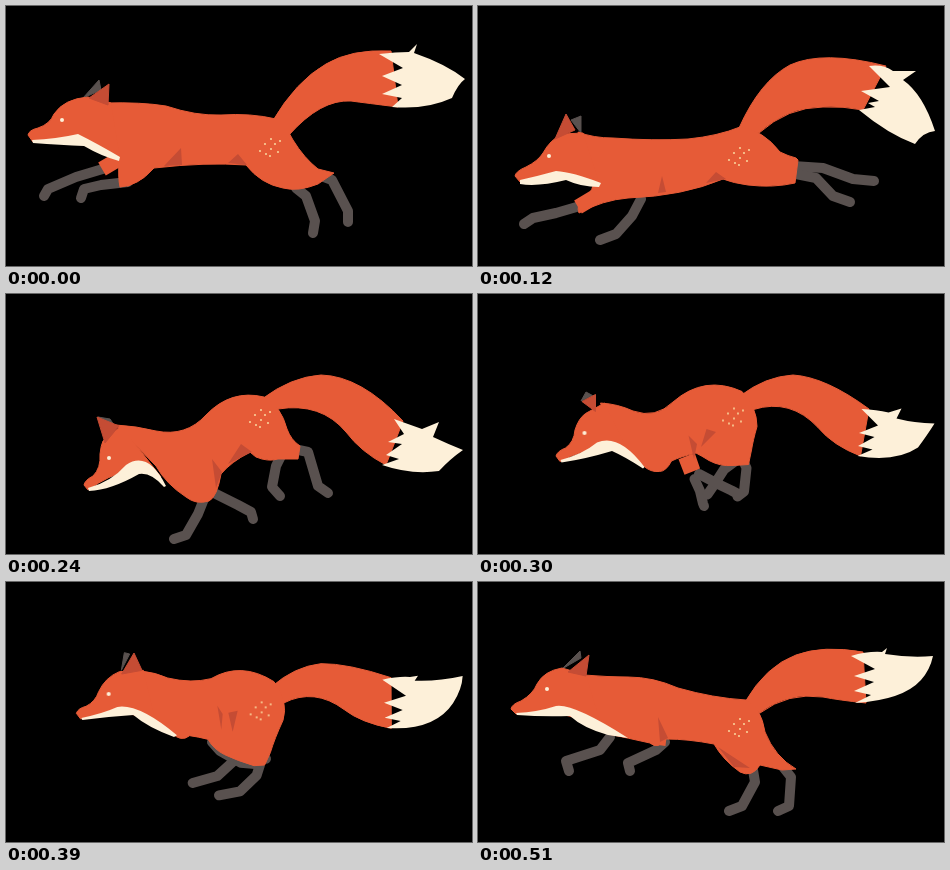
An HTML page without scripts that plays this animation: 466 by 260 pixels, repeating every 0.54 s.

```html
<!DOCTYPE html>
<html lang="en">
<head>
<meta charset="utf-8">
<title>Running fox</title>
<style>
html, body { margin: 0; width: 100%; height: 100%; overflow: hidden; background: #000; }
svg { display: block; width: 100vw; height: 100vh; }
svg * { animation: .54s steps(2) infinite; }
.fur { fill: #e65b37; stroke: #e65b37; }
.shade { fill: #c54c34; stroke: #c54c34; }
.cream { fill: #fdf0d9; }
.dark { fill: #59514f; stroke: #59514f; }
.limb { fill: none; stroke-width: 10; stroke-linecap: round; }
.arm { stroke-width: 15; }

/* Poses are joined by 30 ms steps. */
#tail { animation-name: tail; }
@keyframes tail {
  0% { d: path("M266 116Q290 75 320 58Q345 43 385 45L392 101Q360 97 345 95Q315 93 283 129Z"); animation-timing-function: steps(1) }
  11.111% { d: path("M256 113Q275 70 305 52Q340 35 385 39L392 84Q365 86 345 91Q305 99 273 119Z") }
  22.222% { d: path("M261 122Q282 75 312 59Q345 44 408 60L385 104Q365 100 345 101Q310 101 281 127Z"); animation-timing-function: steps(4) }
  44.444% { d: path("M256 105Q285 83 315 81Q355 82 397 127L380 171Q355 158 340 138Q315 108 272 115Z"); animation-timing-function: steps(4) }
  66.666% { d: path("M268 99Q290 82 315 81Q340 84 385 103L385 153Q355 145 340 129Q310 100 279 116Z"); animation-timing-function: steps(3) }
  83.333% { d: path("M261 116Q285 90 315 83Q345 76 385 81L386 133Q355 132 335 125Q305 116 275 131Z") }
  94.444% { d: path("M267 120Q288 84 318 73Q345 63 385 70L388 121Q360 118 345 115Q310 110 282 131Z"); animation-timing-function: steps(1) }
}
#tip { animation-name: tip; }
@keyframes tip {
  0% { d: path("M373 48Q390 46 403 46L411 38L408 47Q440 58 459 73Q452 78 446 92Q420 104 386 101L396 92L376 88L396 79L376 70L397 62Z"); animation-timing-function: steps(1) }
  11.111% { d: path("M371 41Q388 36 400 40L409 25L408 43Q435 62 455 90Q443 86 434 90Q415 84 390 84L392 76L376 78L392 66L372 62L393 50Z") }
  22.222% { d: path("M391 60Q405 58 415 65L438 65L425 74Q445 88 457 125Q445 126 437 138Q410 128 381 104L397 101L390 97L401 95L383 85L412 81Z"); animation-timing-function: steps(4) }
  44.444% { d: path("M388 125Q402 130 416 135L433 128L427 143Q442 150 457 156Q444 165 433 177Q405 181 376 171L393 165L380 161L396 150L382 148L398 140Z"); animation-timing-function: steps(4) }
  66.666% { d: path("M379 105Q395 101 405 102L414 101L410 106Q430 108 456 103Q456 115 447 130Q430 156 383 153L396 146L380 143L397 136L380 130L402 123Z"); animation-timing-function: steps(3) }
  83.333% { d: path("M371 83Q390 80 402 81L408 79L406 84Q435 83 458 76Q456 92 447 104Q425 136 376 132L392 125L376 121L396 112L374 102L396 95Z") }
  94.444% { d: path("M373 74Q390 69 404 70L409 66L407 72Q432 76 455 74Q452 88 443 98Q425 118 377 121L393 113L376 109L396 100L376 94L397 87Z"); animation-timing-function: steps(1) }
}
#torso { animation-name: torso; }
@keyframes torso {
  0% { d: path("M100 97Q135 96 160 100Q190 110 215 109Q245 107 270 113Q280 120 287 134Q298 152 312 163L328 167L312 178Q292 186 277 182Q255 178 240 159Q200 156 148 162Q132 180 114 181Q112 172 113 155Q95 140 75 132Z"); animation-timing-function: steps(1) }
  11.111% { d: path("M86 99Q105 113 125 115Q165 126 200 122Q235 116 252 110Q282 109 298 143Q305 152 320 153L332 153L328 170Q300 179 278 172Q262 168 240 162Q200 180 134 178Q122 180 108 184Q100 172 95 156Q85 140 70 138Z") }
  22.222% { d: path("M100 126Q115 132 135 132Q175 135 210 133Q240 130 262 121Q285 124 302 146Q310 150 318 152L320 154L317 177Q295 182 270 179Q255 177 245 173Q205 190 150 192Q125 194 101 207Q98 200 105 192Q122 182 110 165Z"); animation-timing-function: steps(4) }
  44.444% { d: path("M110 131Q130 132 150 137Q180 143 200 121Q225 95 258 103Q275 112 281 135Q285 146 294 152L292 165L272 165Q262 168 250 163Q246 160 244 158Q225 168 215 180Q211 203 203 207Q190 211 180 203Q160 190 150 172Z"); animation-timing-function: steps(4) }
  66.666% { d: path("M135 87Q150 88 160 97Q175 107 190 95Q228 66 270 92Q283 115 277 130Q265 147 253 160L249 176L238 178Q222 177 212 170Q200 163 192 160Q180 157 172 154Q165 152 160 148Q155 146 150 140Q140 130 125 122Z"); animation-timing-function: steps(3) }
  83.333% { d: path("M136 93Q150 96 165 94Q205 91 235 100Q250 105 264 115Q282 128 277 155Q276 175 287 192L278 197L268 195Q250 182 232 178Q223 176 222 152Q215 150 207 153Q207 168 203 173Q190 170 182 156Q160 152 130 130Z") }
  94.444% { d: path("M106 93Q130 95 150 95Q175 95 200 106Q235 116 268 118Q283 125 287 150Q297 175 318 187L304 188L282 183Q274 196 262 190Q245 178 236 162Q210 157 188 157Q180 168 172 161Q150 156 130 152Q110 145 90 130Z"); animation-timing-function: steps(1) }
}
#folds { animation-name: folds; }
@keyframes folds {
  0% { d: path("M158 160L175 142L176 159ZM222 157L232 148L241 159Z"); animation-timing-function: steps(1) }
  11.111% { d: path("M130 166L158 153L150 170ZM230 161L250 147L245 162Z") }
  22.222% { d: path("M180 187L184 170L188 186ZM228 177L238 166L248 173Z"); animation-timing-function: steps(4) }
  44.444% { d: path("M206 165L216 178L210 194ZM235 150L246 158L222 170Z"); animation-timing-function: steps(4) }
  66.666% { d: path("M215 118L222 122L222 136ZM222 120L230 118L224 136Z"); animation-timing-function: steps(3) }
  83.333% { d: path("M204 135L206 152L202 171ZM223 152L235 150L232 177Z") }
  94.444% { d: path("M180 135L190 156L182 160ZM240 165L272 186L256 185Z"); animation-timing-function: steps(1) }
}
#head { animation-name: head; }
@keyframes head {
  0% { d: path("M22 129Q23 124 32 122Q44 118 48 108Q58 93 82 91L105 97L114 153Q80 130 27 136Z"); animation-timing-function: steps(1) }
  11.111% { d: path("M18 144Q18 139 28 136Q42 130 46 121Q54 107 70 101L92 104L98 154Q70 140 22 148Z") }
  22.222% { d: path("M37 170Q38 165 48 161Q60 155 65 147Q72 134 84 128L105 127L122 179Q90 165 42 176Z"); animation-timing-function: steps(4) }
  44.444% { d: path("M78 191Q79 186 87 182Q95 174 94 160Q95 151 97 147L115 132L155 183Q125 165 82 196Z"); animation-timing-function: steps(4) }
  66.666% { d: path("M78 133Q80 128 88 126Q97 122 100 112Q106 98 118 92L138 86L150 140Q125 125 82 139Z"); animation-timing-function: steps(3) }
  83.333% { d: path("M55 128Q56 123 64 121Q74 115 78 105Q86 90 104 85L136 93L150 142Q110 122 60 133Z") }
  94.444% { d: path("M33 127Q34 122 43 119Q55 112 59 102Q66 89 84 86L108 93L125 149Q90 125 38 132Z"); animation-timing-function: steps(1) }
}
#cheek { animation-name: cheek; }
@keyframes cheek {
  0% { d: path("M26 134Q50 133 72 128Q92 138 114 151L113 155Q95 150 78 140Q55 139 27 137Z"); animation-timing-function: steps(1) }
  11.111% { d: path("M22 147Q42 146 58 139Q75 137 94 152L90 158Q78 155 70 149Q45 152 22 150Z") }
  22.222% { d: path("M42 174Q60 170 78 165Q95 166 123 177L121 181Q103 181 88 174Q60 181 42 178Z"); animation-timing-function: steps(4) }
  44.444% { d: path("M82 194Q105 188 120 171Q142 156 160 192L158 193Q145 178 133 180Q105 196 83 197Z"); animation-timing-function: steps(4) }
  66.666% { d: path("M83 138Q105 132 118 126Q140 122 173 154L172 156Q150 148 135 134Q110 134 84 140Z"); animation-timing-function: steps(3) }
  83.333% { d: path("M60 132Q82 130 98 123Q118 120 167 152L160 153Q125 140 112 131Q85 136 61 134Z") }
  94.444% { d: path("M38 131Q60 130 78 124Q95 121 150 156L130 153Q105 146 92 134Q65 135 39 133Z"); animation-timing-function: steps(1) }
}
#ear { animation-name: ear; }
@keyframes ear {
  0% { d: path("M83 92L103 78L102 99Z"); animation-timing-function: steps(1) }
  11.111% { d: path("M62 107L83 84L84 107Z") }
  22.222% { d: path("M77 133L88 108L97 124Z"); animation-timing-function: steps(4) }
  44.444% { d: path("M91 123L113 132L99 149Z"); animation-timing-function: steps(4) }
  66.666% { d: path("M117 92L122 69L136 86Z"); animation-timing-function: steps(3) }
  83.333% { d: path("M113 92L140 75L136 93Z") }
  94.444% { d: path("M90 90L111 73L108 94Z"); animation-timing-function: steps(1) }
}
#farEar { animation-name: farEar; }
@keyframes farEar {
  0% { d: path("M77 92L93 74L95 84Z"); animation-timing-function: steps(1) }
  11.111% { d: path("M83 95L90 86L89 102Z") }
  22.222% { d: path("M93 114L103 110L103 127Z"); animation-timing-function: steps(4) }
  44.444% { d: path("M92 123L104 125L110 134Z"); animation-timing-function: steps(4) }
  66.666% { d: path("M114 91L112 71L119 69Z"); animation-timing-function: steps(3) }
  83.333% { d: path("M118 83L131 70L133 78Z") }
  94.444% { d: path("M84 87L102 69L103 76Z"); animation-timing-function: steps(1) }
}
#farFore { animation-name: farFore; }
@keyframes farFore {
  0% { d: path("M100 162L70 171L42 183L38 190"); animation-timing-function: steps(1) }
  11.111% { d: path("M66 173L40 182L20 186L12 189") }
  22.222% { d: path("M102 200L78 207L55 212L46 218"); animation-timing-function: steps(4) }
  44.444% { d: path("M198 205L192 220L180 241L168 245"); animation-timing-function: steps(4) }
  66.666% { d: path("M235 165L252 174L270 178L284 179"); animation-timing-function: steps(3) }
  83.333% { d: path("M148 150L138 159L164 186L180 188") }
  94.444% { d: path("M132 155L122 168L88 179L91 189"); animation-timing-function: steps(1) }
}
#nearFore { animation-name: nearFore; }
@keyframes nearFore {
  0% { d: path("M122 176L95 179L78 183L75 192"); animation-timing-function: steps(1) }
  11.111% { d: path("M110 182L85 198L65 204L52 204") }
  22.222% { d: path("M163 193L154 210L138 228L122 234"); animation-timing-function: steps(4) }
  44.444% { d: path("M210 200L232 211L245 218L247 225"); animation-timing-function: steps(4) }
  66.666% { d: path("M232 160L250 170L262 175L275 176"); animation-timing-function: steps(3) }
  83.333% { d: path("M195 165L208 171L222 175L230 178") }
  94.444% { d: path("M187 160L178 168L150 181L152 189"); animation-timing-function: steps(1) }
}
#farHind { animation-name: farHind; }
@keyframes farHind {
  0% { d: path("M310 168L326 174L342 205L342 216"); animation-timing-function: steps(1) }
  11.111% { d: path("M328 160L343 161L370 186L386 191") }
  22.222% { d: path("M315 160L345 162L375 173L396 175"); animation-timing-function: steps(4) }
  44.444% { d: path("M288 155L302 158L312 192L322 199"); animation-timing-function: steps(4) }
  66.666% { d: path("M242 178L235 190L220 203L197 206"); animation-timing-function: steps(3) }
  83.333% { d: path("M278 192L282 200L262 222L245 228") }
  94.444% { d: path("M305 185L313 195L311 224L300 229"); animation-timing-function: steps(1) }
}
#nearHind { animation-name: nearHind; }
@keyframes nearHind {
  0% { d: path("M290 182L300 190L309 215L307 227"); animation-timing-function: steps(1) }
  11.111% { d: path("M315 172L325 182L340 193L350 196") }
  22.222% { d: path("M318 168L338 172L355 190L372 196"); animation-timing-function: steps(4) }
  44.444% { d: path("M275 162L270 172L266 193L274 202"); animation-timing-function: steps(4) }
  66.666% { d: path("M240 172L222 179L204 192L185 199"); animation-timing-function: steps(3) }
  83.333% { d: path("M228 175L238 180L226 198L190 205") }
  94.444% { d: path("M275 188L277 200L264 224L251 229"); animation-timing-function: steps(1) }
}
#arms { animation-name: arms; }
@keyframes arms {
  0% { d: path("M118 150L96 163M135 165L118 174"); animation-timing-function: steps(1) }
  11.111% { d: path("M115 160L64 174M145 165L108 183") }
  22.222% { d: path("M125 186L100 201M170 175L168 184"); animation-timing-function: steps(4) }
  44.444% { d: path("M195 180L195 196M200 180L200 196"); animation-timing-function: steps(4) }
  66.666% { d: path("M220 145L232 160M220 145L230 158"); animation-timing-function: steps(3) }
  83.333% { d: path("M165 135L155 143M190 145L194 160") }
  94.444% { d: path("M145 138L138 148M182 148L180 163"); animation-timing-function: steps(1) }
}
#eye { animation-name: eye; }
@keyframes eye {
  0% { transform: translate(56px, 114px); animation-timing-function: steps(1) }
  11.111% { transform: translate(54px, 125px) }
  22.222% { transform: translate(71px, 150px); animation-timing-function: steps(4) }
  44.444% { transform: translate(103px, 164px); animation-timing-function: steps(4) }
  66.666% { transform: translate(110px, 114px); animation-timing-function: steps(3) }
  83.333% { transform: translate(88px, 108px) }
  94.444% { transform: translate(69px, 107px); animation-timing-function: steps(1) }
}
#spots { animation-name: spots; }
@keyframes spots {
  0% { transform: translate(265px, 142px); animation-timing-function: steps(1) }
  11.111% { transform: translate(262px, 140px) }
  22.222% { transform: translate(262px, 151px); animation-timing-function: steps(4) }
  44.444% { transform: translate(255px, 125px); animation-timing-function: steps(4) }
  66.666% { transform: translate(257px, 122px); animation-timing-function: steps(3) }
  83.333% { transform: translate(253px, 144px) }
  94.444% { transform: translate(262px, 146px); animation-timing-function: steps(1) }
}
</style>
</head>
<body>
<svg viewBox="0 0 466 260" stroke-linejoin="round">
  <path id="farHind" class="dark limb"/>
  <path id="farFore" class="dark limb"/>
  <path id="nearHind" class="dark limb"/>
  <path id="nearFore" class="dark limb"/>
  <path id="arms" class="fur arm"/>
  <path id="tail" class="fur"/>
  <path id="tip" class="cream"/>
  <path id="farEar" class="dark"/>
  <path id="torso" class="fur"/>
  <path id="folds" class="shade" stroke-width="0"/>
  <path id="head" class="fur"/>
  <path id="cheek" class="cream"/>
  <path id="ear" class="shade"/>
  <circle id="eye" class="cream" r="2"/>
  <path id="spots" d="M-11 3h0M-6 -4h0M-5 6h0M0 -9h0M0 1h0M4 -4h0M7 4h0M-1 8h0M9 -7h0" stroke="#f8cf98" stroke-width="2.2" stroke-linecap="round"/>
</svg>
</body>
</html>
```
